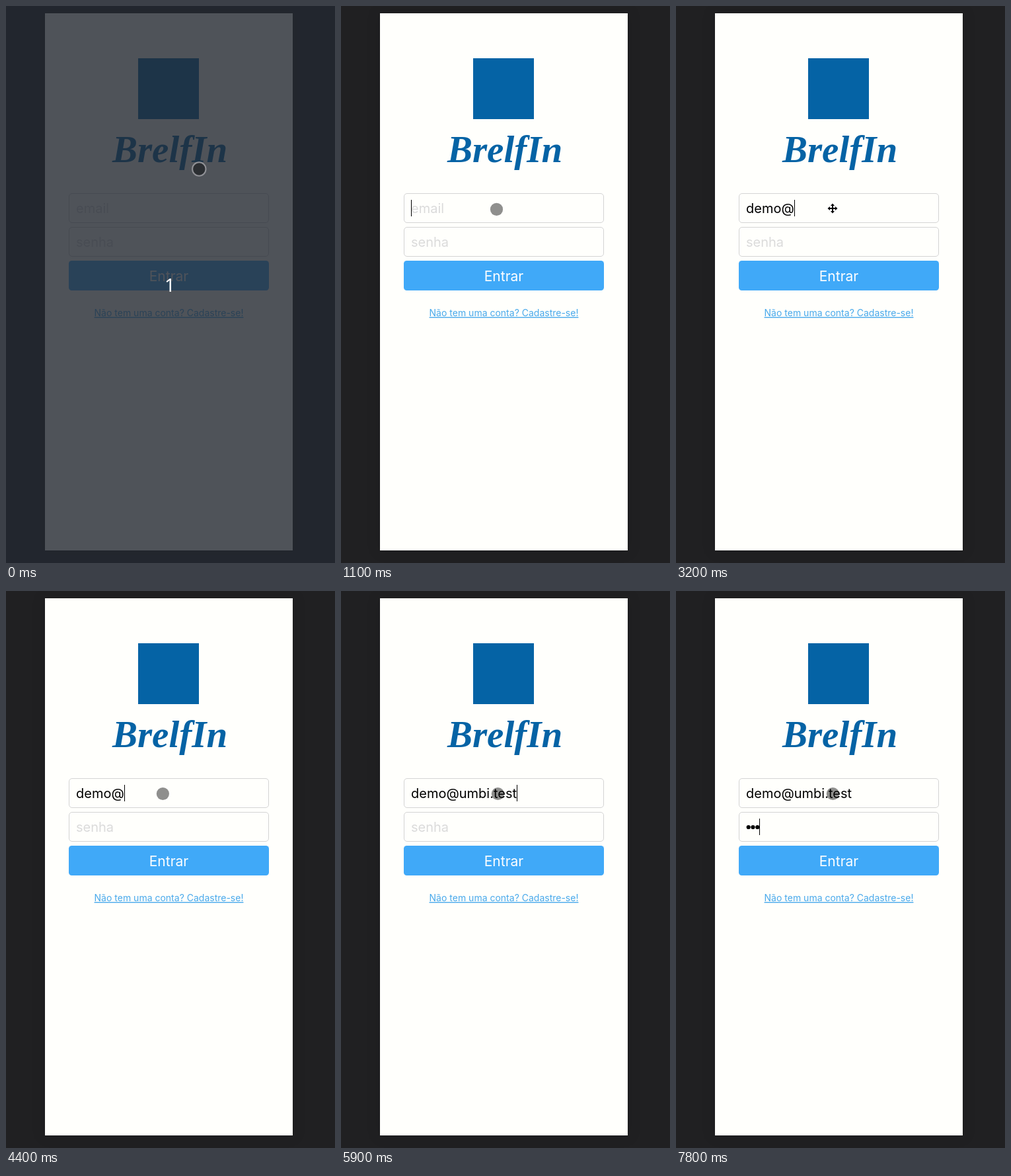
Recreate the animation shown at these times as an HTML page. Size 498 by 842 pixels, loop 8000 ms.

```html
<!DOCTYPE html>
<html lang="pt-BR">
<head>
<meta charset="utf-8">
<title>Login</title>
<style>
  html, body { margin: 0; width: 100%; height: 100%; overflow: hidden; background: #202022; }
  svg { display: block; width: 498px; height: 842px; font-family: Inter, sans-serif; }
  .page { fill: #fffffc; filter: drop-shadow(0 0 10px rgba(0, 0, 0, .12)); }
  .field { fill: none; stroke: #d4d4d4; }
  .value { font-size: 20px; fill: #000; white-space: pre; }
  .hint { fill: #dbdbdb; }
  .middle { text-anchor: middle; }
  .brand { font: italic bold 57px "Liberation Serif", serif; fill: #0563a5; }
  .link { font-size: 14px; fill: #48a9eb; text-decoration: underline; }
  .count { font: 28px "Noto Sans", sans-serif; fill: #fff; }
</style>
</head>
<body>
<svg viewBox="0 0 498 842">
  <rect class="page" x="59" y="11" width="375" height="812"/>
  <rect x="200" y="79" width="92" height="92" fill="#0563a5"/>
  <text class="brand middle" x="248" y="236">BrelfIn</text>

  <rect class="field" x="95.5" y="283.5" width="302" height="44" rx="4.5"/>
  <rect class="field" x="95.5" y="334.5" width="302" height="44" rx="4.5"/>
  <text id="email" class="value" x="106" y="313"></text>
  <text id="senha" class="value hint" x="106" y="364">senha</text>
  <g id="dots">
    <circle cx="109.7" cy="357" r="3.1"/>
    <circle cx="116.5" cy="357" r="3.1"/>
    <circle cx="123.3" cy="357" r="3.1"/>
  </g>
  <rect id="caret" width="1" height="25"/>

  <rect x="95" y="385" width="303" height="45" rx="4.5" fill="#40a9f8"/>
  <text class="middle" x="246.5" y="416" font-size="21" fill="#fff">Entrar</text>
  <text class="link middle" x="246.5" y="469">Não tem uma conta? Cadastre-se!</text>

  <g id="countdown">
    <rect width="498" height="842" fill="rgb(36,40,49)" fill-opacity=".8"/>
    <text class="count middle" x="248" y="432">1</text>
    <circle cx="292.3" cy="246.5" r="10.2" fill="#2b2e32" stroke="#909196" stroke-width="2"/>
  </g>
  <circle id="pointer" r="9.6" fill="#000" fill-opacity=".44"/>
  <path id="mover" transform="translate(237 306)" stroke="#fff" stroke-width="1.6" paint-order="stroke"
    d="M0-7.5 3-4H1V-1H4V-3L7.5 0 4 3V1H1V4H3L0 7.5-3 4H-1V1H-4V3L-7.5 0-4-3V-1H-1V-4H-3Z"/>
</svg>
<script>
const LOOP = 8000;
const ADDRESS = "demo@umbi.test";
const DOT_STEP = 6.8;

// Each row lists only what changes at that time; everything else holds.
const steps = [
  [0,    { countdown: true, pointer: [292.3, 246.5], typed: 0, dots: 0, focus: "email", caret: false, mover: false }],
  [200,  { countdown: false }],
  [700,  { pointer: [288.7, 254.3] }],
  [900,  { pointer: [268, 275] }],
  [1000, { pointer: [245, 298] }],
  [1100, { pointer: [235.5, 307.4], caret: true }],
  [1300, { pointer: [237.4, 306.5] }],
  [1700, { caret: false }],
  [1900, { typed: 1, caret: true }],
  [2000, { typed: 2 }],
  [2100, { typed: 3 }],
  [2200, { typed: 4 }],
  [2800, { caret: false }],
  [3200, { typed: 5, caret: true, mover: true }],
  [3400, { mover: false }],
  [3800, { caret: false }],
  [4400, { caret: true }],
  [4700, { typed: 6 }],
  [4800, { typed: 8 }],
  [4900, { typed: 9 }],
  [5100, { typed: 10 }],
  [5400, { typed: 11 }],
  [5600, { typed: 12 }],
  [5700, { typed: 13 }],
  [5900, { typed: 14 }],
  [6600, { focus: "senha" }],
  [7200, { caret: false }],
  [7600, { dots: 1, caret: true }],
  [7700, { dots: 2 }],
  [7800, { dots: 3 }]
];

const el = id => document.getElementById(id);
const show = (node, on) => node.setAttribute("visibility", on ? "visible" : "hidden");
const place = (node, attrs) => {
  for (const name in attrs) node.setAttribute(name, attrs[name]);
};
const [email, senha, dots, caret, countdown, pointer, mover] =
  ["email", "senha", "dots", "caret", "countdown", "pointer", "mover"].map(el);

const stateAt = time =>
  Object.assign({}, ...steps.filter(([start]) => start <= time).map(([, change]) => change));

function draw(time) {
  const s = stateAt(time);
  show(countdown, s.countdown);
  show(pointer, !s.countdown && !s.mover);
  show(mover, s.mover);
  place(pointer, { cx: s.pointer[0], cy: s.pointer[1] });

  email.textContent = s.typed ? ADDRESS.slice(0, s.typed) : "email";
  email.classList.toggle("hint", !s.typed);
  show(senha, !s.dots);
  [...dots.children].forEach((dot, i) => show(dot, i < s.dots));

  const onEmail = s.focus === "email";
  const emailWidth = s.typed ? email.getComputedTextLength() : 0;
  const offset = onEmail ? emailWidth : s.dots * DOT_STEP;
  place(caret, { x: Math.round(106 + offset), y: onEmail ? 293 : 344 });
  show(caret, s.caret);
}

const start = performance.now();
function tick() {
  draw((performance.now() - start) % LOOP);
  requestAnimationFrame(tick);
}
tick();
</script>
</body>
</html>
```
